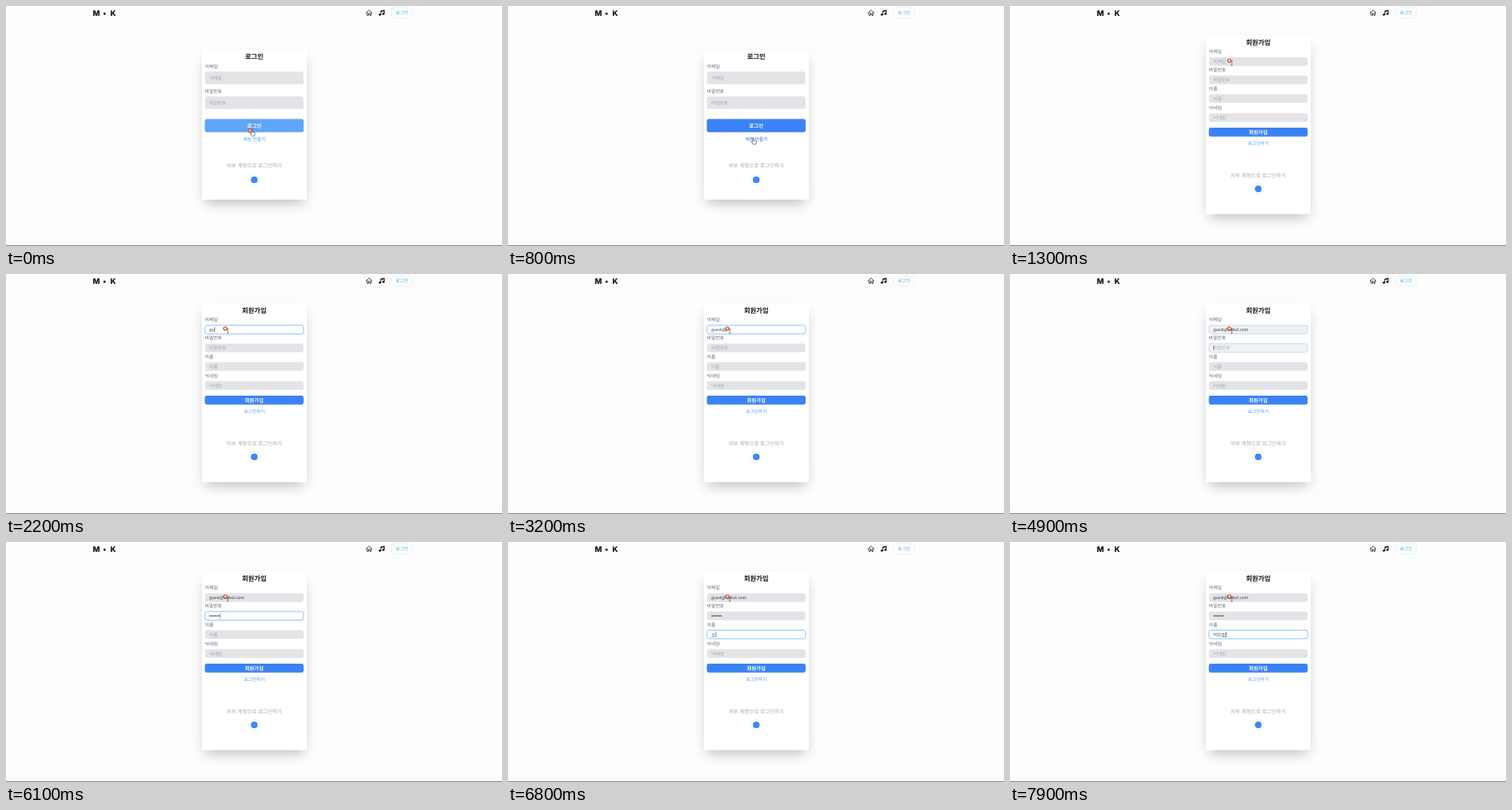
An HTML page for the animation above (8 s loop, 600 px wide and 290 px high).

```html
<!DOCTYPE html>
<html lang="ko">
<head>
<meta charset="utf-8">
<style>
  html, body { margin: 0; width: 100%; height: 100%; overflow: hidden; background: #fdfdfe; }
  svg { display: block; width: 600px; height: 290px; text-rendering: geometricPrecision;
        font-family: "Noto Sans CJK KR", "Noto Sans CJK", "Noto Sans", sans-serif; }
</style>
</head>
<body>
<svg id="stage" viewBox="0 0 600 290"></svg>
<script>
const LOOP = 8000;
const stage = document.getElementById('stage');
const pen = document.createElement('canvas').getContext('2d');

const SWAP = 900;                       // login page gives way to sign-up
const FOCUS = [1500, 4800, 6300, LOOP]; // when each sign-up field takes focus
const EMAIL = 'guest@kubol.com';
const EMAIL_KEYS = [2000, 2200, 2600, 2900, 3100, 3200, 3300, 3400, 3500, 3600, 3700, 4100, 4200, 4200, 4400];
const DOT_KEYS = [5200, 5400, 5600, 5700, 5900, 6000];
const NAME_STEPS = [[6800, 'ㅇ'], [7100, '어'], [7200, '얻'], [7400, '어드'], [7700, '어듬'], [7900, '어드민']];

const clamp = v => Math.max(0, Math.min(1, v));
const progress = (t, from, span) => clamp((t - from) / span);
const ease = p => p * p * (3 - 2 * p);
const lerp = (a, b, p) => a + (b - a) * p;
const mix = (a, b, p) => `rgb(${a.map((v, i) => Math.round(lerp(v, b[i], p)))})`;
const typed = (keys, t) => keys.filter(k => k <= t).length;

// Text centred vertically on y.
const text = (s, x, y, size, fill, extra = '') =>
  `<text x="${x}" y="${y + size * 0.37}" font-size="${size}" fill="${fill}" ${extra}>${s}</text>`;
const centred = (s, y, size, fill, weight = 400, x = 300.3) =>
  text(s, x, y, size, fill, `text-anchor="middle" font-weight="${weight}"`);
const box = (x, y, w, h, r, fill, extra = '') =>
  `<rect x="${x}" y="${y}" width="${w}" height="${h}" rx="${r}" fill="${fill}" ${extra}/>`;

function textWidth(s, size) {
  pen.font = `100px "Noto Sans CJK KR", "Noto Sans CJK", "Noto Sans", sans-serif`;
  return pen.measureText(s).width * size / 100;
}

const header = `
  <g font-family="Inter, sans-serif" font-weight="800" font-size="9.2" fill="#111" text-anchor="middle">
    <text x="109.3" y="11.8">M</text><text x="119.3" y="11.8">•</text><text x="129.6" y="11.8">K</text></g>
  <path d="M435.8 8.2 439.2 5l3.4 3.2M436.8 7.5v3.8h1.6V8.9h1.6v2.4h1.6V7.5"
    fill="none" stroke="#222" stroke-width=".8" stroke-linejoin="round" stroke-linecap="round"/>
  <path d="M453.3 10.3V6l4.2-1v4.4M453.3 6.9l4.2-1" fill="none" stroke="#111" stroke-width=".9"/>
  <ellipse cx="452.3" cy="10.4" rx="1.5" ry="1.2" fill="#111"/>
  <ellipse cx="456.5" cy="9.5" rx="1.5" ry="1.2" fill="#111"/>
  ${box(466.2, 1.8, 25.4, 12.6, 5.5, '#fff', 'stroke="#dbe4ec" stroke-width=".6"')}
  ${centred('로그인', 8, 5.5, '#3fa4dc', 500, 479)}
  ${box(0, 289, 600, 1, 0, '#8b8b8d')}`;

const card = (top, bottom) =>
  box(240.8, top + 11.5, 119.4, bottom - top - 7.5, 0, '#000', 'opacity=".25" filter="url(#soft)"') +
  box(237, top, 127, bottom - top, 0, '#fff');

const social = (textY, iconY) =>
  centred('외부 계정으로 로그인하기', textY, 6.3, '#a3a5ab') +
  `<circle cx="300.3" cy="${iconY}" r="6.6" fill="#fff" stroke="#e6e6ea" stroke-width=".6"/>
   <circle cx="300.3" cy="${iconY}" r="4.1" fill="#4285f4"/>`;

// focus runs from 0 (grey, no border) to 1 (white, blue border).
function field(label, labelY, y, h, focus = 0, content = '') {
  const fill = mix([227, 227, 232], [255, 255, 255], focus);
  const border = `stroke="#62adf2" stroke-width=".7" stroke-opacity="${focus}"`;
  return text(label, 240.6, labelY, 5.6, '#5d6067') +
    box(240.7, y, 119.2, h, 2.6, fill, border) +
    (content || text(label, 246, y + h / 2, 5.5, '#a2a6ae'));
}

const button = (label, y, h, fill) =>
  box(240.5, y, 119.5, h, 2.4, fill) + centred(label, y + h / 2, 6.2, '#fff', 700);

const caret = (x, y) => box(x, y - 3, 0.5, 6, 0, '#222');

function loginPage(t) {
  const p = ease(progress(t, 100, 250));
  return card(53, 234) +
    centred('로그인', 61.5, 8.1, '#111', 700) +
    field('이메일', 72.5, 79.2, 15.4) +
    field('비밀번호', 102.5, 109.2, 15.4) +
    button('로그인', 136.4, 16.2, mix([96, 165, 250], [59, 130, 246], p)) +
    centred('계정 만들기', 160.5, 5.6, mix([70, 155, 245], [37, 99, 235], p), 500) +
    social(193, 210);
}

function signupPage(t) {
  const focus = i => ease(progress(t, FOCUS[i], 200)) * (1 - ease(progress(t, FOCUS[i + 1], 200)));
  const active = i => t >= FOCUS[i] && t < FOCUS[i + 1];
  const values = ['', '', ''];
  const ends = [246, 246, 246];
  const rows = [67.2, 89.2, 111.7];

  const email = EMAIL.slice(0, typed(EMAIL_KEYS, t));
  if (email) {
    values[0] = text(email, 246, rows[0], 5, '#333');
    ends[0] += textWidth(email, 5);
  }
  const dots = typed(DOT_KEYS, t);
  for (let i = 0; i < dots; i++)
    values[1] += `<circle cx="${247.1 + 2.1 * i}" cy="${rows[1]}" r=".8" fill="#222"/>`;
  ends[1] += 2.1 * dots;

  const step = NAME_STEPS.filter(s => s[0] <= t).pop();
  if (step) {
    const name = step[1];
    const start = 246 + textWidth(name.slice(0, -1), 5.5);
    ends[2] += textWidth(name, 5.5);
    values[2] = text(name, 246, rows[2], 5.5, '#333') +
      box(start, rows[2] + 2.8, ends[2] - start, 0.4, 0, '#333');
  }

  const carets = rows.map((y, i) => active(i) ? caret(ends[i] + 0.2, y) : '').join('');
  return card(35.5, 251.5) +
    centred('회원가입', 44, 8.1, '#111', 700) +
    field('이메일', 55, 62, 10.4, focus(0), values[0]) +
    field('비밀번호', 77.3, 84, 10.4, focus(1), values[1]) +
    field('이름', 99.6, 106.5, 10.4, focus(2), values[2]) +
    field('닉네임', 123, 129.6, 10.4) +
    carets +
    button('회원가입', 147, 10.8, '#3b82f6') +
    centred('로그인하기', 165.8, 5.5, '#4a9df3', 500) +
    social(204.5, 221);
}

function pointer(t) {
  const down = ease(progress(t, 100, 300));
  const up = ease(progress(t, SWAP, 400));
  const x = lerp(lerp(298, 297.3, down), 268.3, up);
  const y = lerp(lerp(153.5, 163.5, down), 69, up);
  const ring = t < 100 || t >= 1300
    ? `<circle cx="${x - 3}" cy="${y - 3}" r="2" fill="#fff" fill-opacity=".6" stroke="#d9442c" stroke-width="1.2"/>` : '';
  let shape;
  if (t < SWAP)
    shape = `<path d="M-1.2-3.8q.7-.6 1.2 0v2.6l2.4.6q.8.3.7 1.2L2.6 3.6h-3.4L-2.8.7q.1-.9 1.6.1z" fill="#fff" stroke="#333" stroke-width=".6"/>`;
  else if (up < 1)
    shape = `<path d="M-1.5-3v5.6l1.3-1.2.9 2 .9-.4-.9-1.9h1.8z" fill="#fff" stroke="#222" stroke-width=".5"/>`;
  else
    shape = `<path d="M-1-2.7h2M0-2.7v5.4M-1 2.7h2" fill="none" stroke="#444" stroke-width=".6"/>`;
  return `<g transform="translate(${x} ${y})">${shape}</g>` + ring;
}

const defs = `<defs><filter id="soft" x="-50%" y="-50%" width="200%" height="200%">
  <feGaussianBlur stdDeviation="7.8"/></filter></defs>`;

function frame() {
  const t = performance.now() % LOOP;
  const page = t < SWAP ? loginPage(t) : signupPage(t);
  stage.innerHTML = defs + box(0, 0, 600, 290, 0, '#fdfdfe') + page + header + pointer(t);
  requestAnimationFrame(frame);
}
frame();
</script>
</body>
</html>
```
